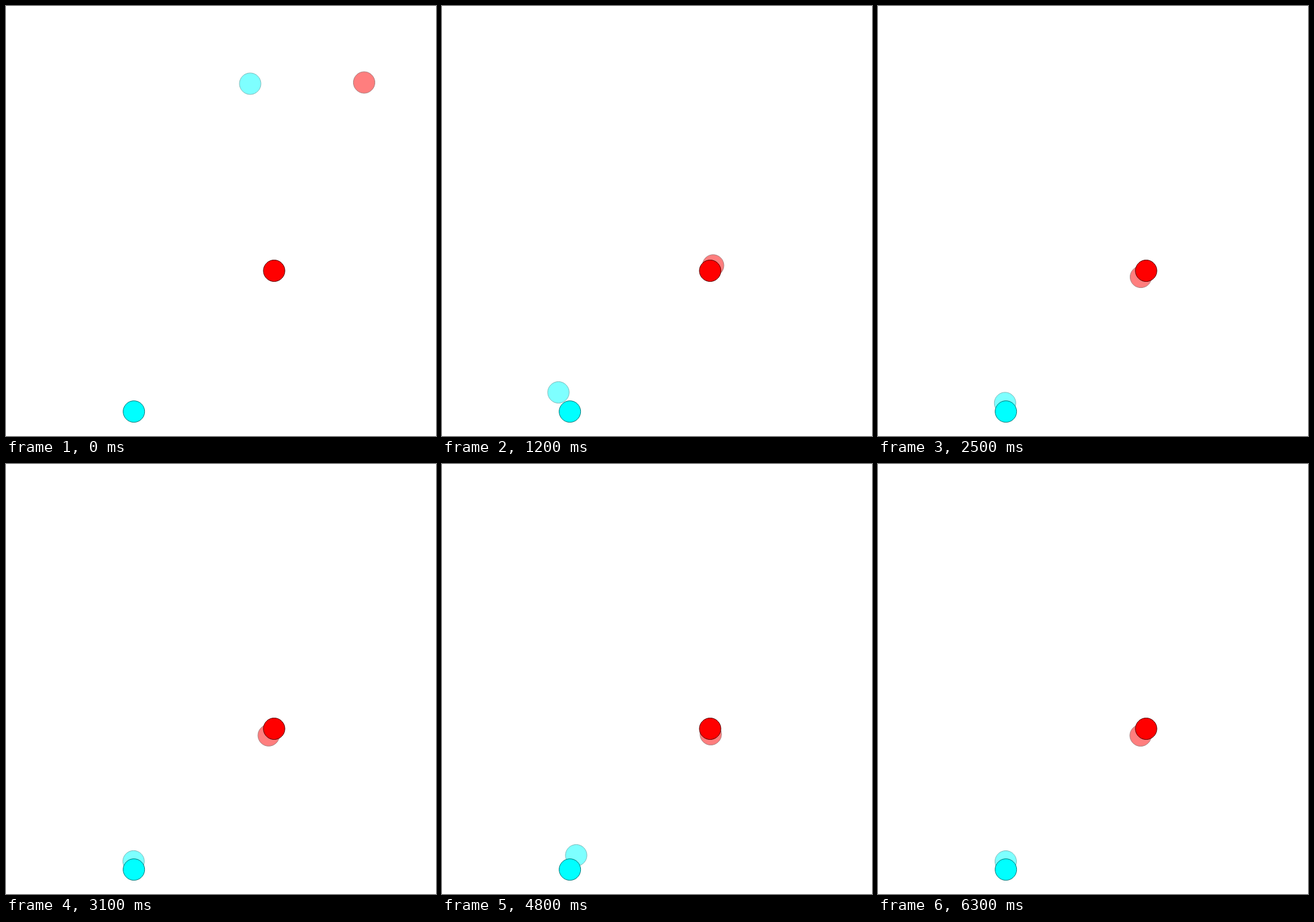
Write an HTML page that moves like this. It is 700 px wide and 700 px high and loops after 6400 ms.

```html
<!DOCTYPE html>
<html lang="en">
<head>
<meta charset="utf-8">
<style>
  html, body { margin: 0; width: 100%; height: 100%; overflow: hidden; background: #fff; }
  svg { display: block; width: 100%; height: 100%; }
  .red { fill: #f00; stroke: #500; }
  .cyan { fill: #0ff; stroke: #077; }
  .moving { opacity: .5; }
</style>
</head>
<body>
<svg viewBox="0 0 700 700">
  <circle id="red" class="red moving" r="17.5"/>
  <circle id="cyan" class="cyan moving" r="17.5"/>
  <circle class="red" cx="436.5" cy="431" r="17.5"/>
  <circle class="cyan" cx="208.2" cy="660.2" r="17.5"/>
</svg>
<script>
const STEP = 100, STEPS = 64;
const red = document.getElementById('red');
const cyan = document.getElementById('cyan');

function place(circle, x, y) {
  circle.setAttribute('cx', x);
  circle.setAttribute('cy', y);
}

function draw() {
  const n = Math.floor(performance.now() / STEP) % STEPS;
  const fade = .79 ** n;                  // error shrinks by a fixed ratio
  const turn = Math.max(0, 1 - n / 11.5); // steady rotation until aligned
  // Near the goal the controller overshoots back and forth on every step
  const swing = Math.min(1, Math.max(0, (n - 14) / 4)) * (n % 2 ? -1 : 1);

  place(red,
    432.5 + 150.5 * fade + 5 * swing,
    441 - 316.5 * fade - swing);
  place(cyan,
    213.2 - 400 * fade + 584.3 * turn ** 3 + 5.25 * swing,
    642 - 220 * fade - 295.5 * turn - 5 * swing);
  requestAnimationFrame(draw);
}
draw();
</script>
</body>
</html>
```
